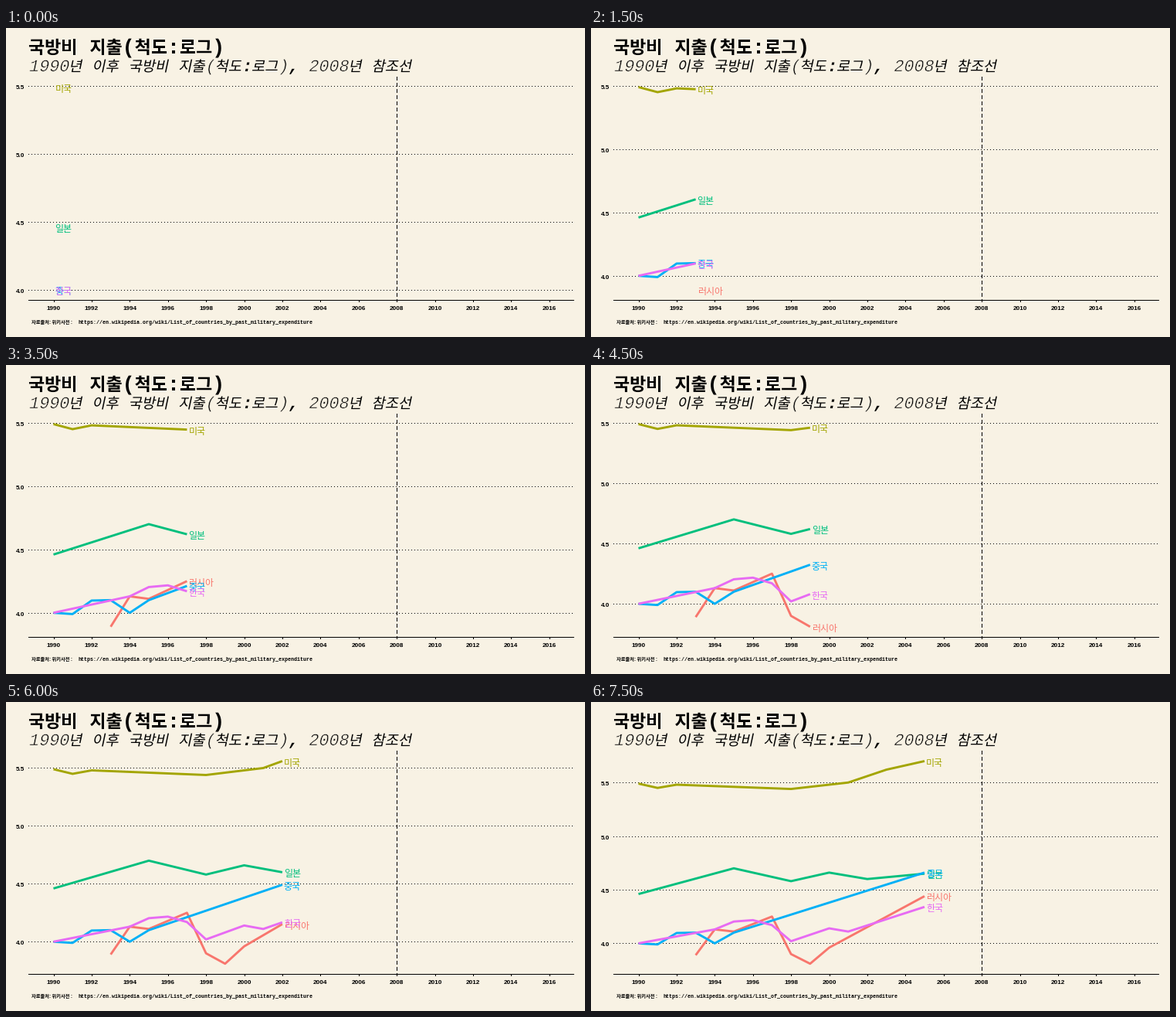
Write a matplotlib script that moves like this. It is 750 by 400 pixels and loops after 8 s.

```python
import numpy as np
import matplotlib.pyplot as plt
from matplotlib.animation import FuncAnimation
from matplotlib.patches import PathPatch
from matplotlib.textpath import TextPath
from matplotlib.transforms import Affine2D

W, H, DPI = 750, 400, 100
PX = 72 / DPI  # points per pixel
PAPER = "#F8F2E4"
START, YEARS = 1990, 16
LEFT, RIGHT = 29, 735
PANEL_TOP, AXIS_Y = 63, 352
DATA_TOP, DATA_BOTTOM = 76.5, 338.8
CJK, MONO, SANS = "Noto Sans CJK JP", "Liberation Mono", "Liberation Sans"

# Turning points as (years since 1990, log10 of spending), straight in between.
SERIES = [
    ("러시아", "#F8766D", [(3, 3.89), (4, 4.13), (5, 4.11), (7, 4.25),
                        (8, 3.9), (9, 3.81), (10, 3.96), (15, 4.44)]),
    ("미국", "#A3A500", [(0, 5.49), (1, 5.45), (2, 5.48), (8, 5.44),
                       (11, 5.5), (13, 5.62), (15, 5.7)]),
    ("일본", "#00BF7D", [(0, 4.46), (5, 4.7), (8, 4.58), (10, 4.66),
                       (12, 4.6), (15, 4.65)]),
    ("중국", "#00B0F6", [(0, 4), (1, 3.99), (2.5, 4.15), (4, 4),
                       (5, 4.1), (15, 4.66)]),
    ("한국", "#E76BF3", [(0, 4), (4, 4.13), (5.5, 4.24), (7, 4.17),
                       (8, 4.02), (10, 4.14), (11, 4.11), (15, 4.34)]),
]

fig = plt.figure(figsize=(W / DPI, H / DPI), dpi=DPI, facecolor=PAPER)
ax = fig.add_axes([0, 0, 1, 1])
ax.set_xlim(0, W)
ax.set_ylim(H, 0)
ax.axis("off")


def year_x(t):
    return 61.5 + 24.7 * t


def rule(xs, ys, dash="-", z=1):
    return ax.plot(xs, ys, color="black", lw=PX, ls=dash, zorder=z,
                   antialiased=False, dash_capstyle="butt",
                   solid_capstyle="butt")[0]


def small(x, y, text, size, font, weight="bold", color="black", ha="left"):
    return ax.text(x, y, text, fontsize=size * PX, family=font, weight=weight,
                   color=color, ha=ha, va="baseline", zorder=4)


def heading(x, y, text, size, weight, slant=0):
    """Set mixed text: monospaced Latin with smaller Hangul."""
    for ch in text:
        hangul = ch >= "가"
        em = .86 * size if hangul else size
        face = "bold" if ch in ":," else weight
        path = TextPath((0, 0), ch, size=em,
                        prop=dict(family=CJK if hangul else MONO, weight=face))
        place = Affine2D().skew_deg(slant, 0).scale(1, -1).translate(x, y)
        # A paper-coloured edge thins the light Latin letters.
        thin = face == "normal" and not hangul
        ax.add_patch(PathPatch(place.transform_path(path), fc="black",
                               ec=PAPER, lw=.6 * PX if thin else 0))
        x += em * (.92 if hangul else .6)


heading(29, 33, "국방비 지출(척도:로그)", 26.7, "bold")
heading(29, 56, "1990년 이후 국방비 지출(척도:로그), 2008년 참조선",
        21.7, "normal", slant=12)
small(33, 383, "자료출처: 위키사전 :", 6.2, CJK)
small(93, 383, "https://en.wikipedia.org/wiki/"
      "List_of_countries_by_past_military_expenditure", 6.667, MONO)

rule([LEFT, RIGHT], [AXIS_Y, AXIS_Y])
for t in range(0, 27, 2):
    rule([year_x(t)] * 2, [AXIS_Y, AXIS_Y + 2])
    small(year_x(t), 365, str(START + t), 8.2, SANS, ha="center")
rule([year_x(18)] * 2, [PANEL_TOP, AXIS_Y], (0, (5, 4)), z=3)

grid = [(tick, rule([LEFT, RIGHT], [0, 0], (0, (1, 3))),
         small(24, 0, f"{tick:.1f}", 8.2, SANS, ha="right"))
        for tick in np.arange(4, 6, .5)]

tracks = []
for name, color, knots in SERIES:
    ts, logs = zip(*knots)
    years = np.arange(ts[0], YEARS)
    line, = ax.plot([], [], color=color, lw=2.9 * PX, zorder=2,
                    solid_capstyle="butt", solid_joinstyle="round")
    label = small(0, 0, name, 12, CJK, "normal", color)
    tracks.append((years, np.interp(years, ts, logs), line, label))


def update(now):
    seen = np.concatenate([v[t <= now] for t, v, _, _ in tracks])
    low, high = seen.min(), seen.max()

    def value_y(v):
        return DATA_BOTTOM - (v - low) / (high - low) * (DATA_BOTTOM - DATA_TOP)

    for tick, line, label in grid:
        y = value_y(tick)
        line.set_ydata([y, y])
        label.set_y(y + 4)
    for years, values, line, label in tracks:
        shown = years <= now
        xs, ys = year_x(years[shown]), value_y(values[shown])
        line.set_data(xs, ys)
        line.set_visible(len(xs) > 1)
        label.set_visible(len(xs) > 0)
        if len(xs):
            label.set_position((xs[-1] + 2, ys[-1] + 6))
    return []


anim = FuncAnimation(fig, update, frames=YEARS, interval=500,
                     init_func=lambda: update(0), repeat=True, repeat_delay=0)
plt.show()
```
